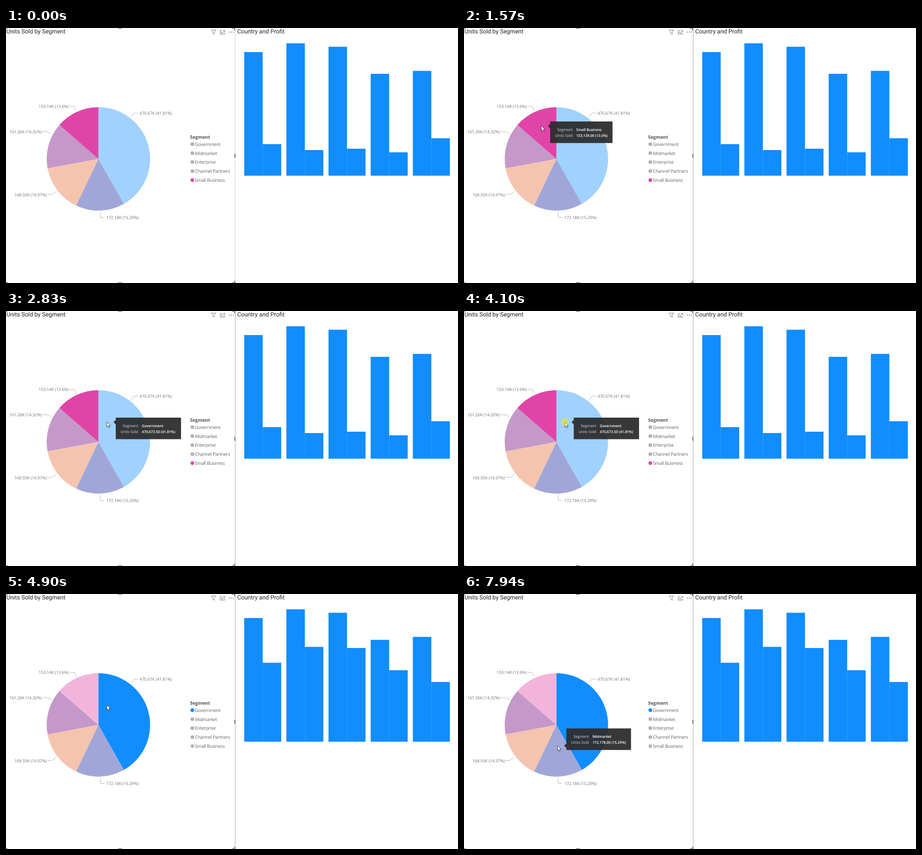
An HTML page for the animation above (8 s loop, 997 px wide and 562 px high).

```html
<!DOCTYPE html>
<html lang="en">
<head>
<meta charset="utf-8">
<title>Segment cross-filter</title>
<style>
  html, body { margin: 0; width: 100%; height: 100%; overflow: hidden; background: #fff; }
  svg { display: block; width: 100vw; height: 100vh; }
  text { font-family: "Open Sans", "Noto Sans", sans-serif; text-rendering: geometricPrecision; }
  .title { font: 13px Roboto, sans-serif; fill: #252423; }
  .label { font-size: 9.2px; letter-spacing: -.12px; fill: #74726f; }
  .legend { font-size: 10.2px; letter-spacing: -.3px; fill: #686664; }
  .head { font-size: 10.1px; font-weight: 700; fill: #55524f; }
  .tip { font-size: 8.3px; letter-spacing: -.02px; fill: #d6d6d6; text-anchor: end; }
  .value { font-size: 8px; font-weight: 600; letter-spacing: -.1px; fill: #fff; }
  .line { fill: none; stroke: #b4b2b0; }
  .icon { fill: none; stroke: #777; }
  .grip { fill: none; stroke: #7d7d7d; stroke-width: 2; }
</style>
</head>
<body>
<svg id="stage" viewBox="0 0 997 562">
  <g id="chart"></g>
  <path id="divider" d="M505.5 0V562"/>
  <g class="grip">
    <path d="M247 .5h9M247 561.5h9M0 .5h3M0 561.5h4M499 .5h5.5v5M499 561.5h5.5v-5"/>
    <path d="M505 277v9" stroke-width="2.5"/>
  </g>
  <g class="icon">
    <path d="M452.5 4.5H463L459.3 9V13.8L456.3 12V9Z"/>
    <path d="M477 5.5h-4.500v8h10v-3.500M479 5.500h3.500v3M482 6l-5 4.500M475.500 8v3h3.500"/>
  </g>
  <g fill="#666"><circle cx="492.5" cy="9" r="1.1"/><circle cx="497" cy="9" r="1.1"/><circle cx="501.500" cy="9" r="1.1"/></g>
  <text class="title" x="1" y="12">Units Sold by Segment</text>
  <text class="title" x="510" y="12">Country and Profit</text>
  <g id="tooltip">
    <path id="box" fill="rgb(46,46,46)" fill-opacity=".95"/>
    <text class="tip" x="49.500" y="21">Segment</text>
    <text class="tip" x="49.500" y="33.500">Units Sold</text>
    <text class="value" id="name" x="57.500" y="21"></text>
    <text class="value" id="units" x="57.500" y="33.500"></text>
  </g>
  <path id="cursor" d="M0 0V11.200L2.600 8.900 4.300 12.800 6.200 12 4.500 8.200H8Z" fill="#fff" stroke="#2b2b38" stroke-width=".9"/>
  <circle id="click" r="8.500" fill="#ffea00" fill-opacity=".5"/>
</svg>
<script>
const LOOP = 8000;
const $ = id => document.getElementById(id);
const chart = $('chart');

function add(tag, attrs, text) {
  const el = document.createElementNS('http://www.w3.org/2000/svg', tag);
  set(el, attrs);
  if (text) el.textContent = text;
  return chart.appendChild(el);
}
function set(el, attrs) {
  for (const key in attrs) el.setAttribute(key, attrs[key]);
}

// Pie: share, full colour, dimmed colour
const CX = 203.8, CY = 288.5, R = 114;
const slices = [
  [.4181, '#118dff', '#a0d1ff'],
  [.1529, '#12239e', '#a0a7d8'],
  [.1497, '#e66c37', '#f5c4af'],
  [.1432, '#6b007b', '#c499ca'],
  [.1361, '#e044a7', '#f3b4dc']
];
const rim = f => `${CX + R * Math.sin(f * 2 * Math.PI)} ${CY - R * Math.cos(f * 2 * Math.PI)}`;
let sum = 0;
const wedges = slices.map(([share]) => {
  const from = sum;
  sum += share;
  return add('path', { d: `M${CX} ${CY}L${rim(from)}A${R} ${R} 0 0 1 ${rim(sum)}Z` });
});

[
  ['470.67K (41.81%)', 294.5, 191, 'M276 195.5L282 187.5H291.5'],
  ['172.18K (15.29%)', 221, 421, 'M207.5 406L208.5 417.5H217'],
  ['168.55K (14.97%)', 18.5, 370.5, 'M111 360L102 366.500H92'],
  ['161.26K (14.32%)', 7.5, 231.500, 'M100.500 233L91 228.500H81'],
  ['153.14K (13.6%)', 72, 175.500, 'M155 182L150.500 172.500H141']
].forEach(([text, x, y, d]) => {
  add('path', { d, class: 'line' });
  add('text', { x, y, class: 'label' }, text);
});

add('text', { x: 406, y: 243.5, class: 'head' }, 'Segment');
const dots = ['Government', 'Midmarket', 'Enterprise', 'Channel Partners', 'Small Business'].map((text, i) => {
  const y = 256 + i * 19.8;
  add('text', { x: 416.5, y: y + 3.8, class: 'legend' }, text);
  return add('circle', { cx: 411, cy: y, r: 4 });
});

// Bars: top of the total, then of the part for each selection
const BASE = 325.5;
const bars = [
  [53, 256, 151.5],
  [33.7, 269, 116.5],
  [41.3, 266, 119],
  [101, 274, 168],
  [94.5, 243, 194]
];
const bar = (x, y) => add('rect', { x, y, width: 40.8, height: BASE - y, fill: '#118dff' });
const parts = bars.map(([top], i) => {
  const x = 525.4 + i * 93;
  bar(x, top);
  return bar(x + 40.8, top);
});

const tips = {
  small: ['Small Business', '153,139.00 (13.6%)', 137.5, 10],
  gov: ['Government', '470,673.50 (41.81%)', 144, 10],
  mid: ['Midmarket', '172,178.00 (15.29%)', 142.5, 38]
};

// Number of the n even steps from a to b that have begun
const step = (t, a, b, n) => t < a ? 0 : Math.min(n, Math.floor((t - a) / (b - a) * (n - 1) + 1e-6) + 1);
const ease = (p, power) => 1 - Math.pow(1 - Math.max(0, Math.min(1, p)), power);
const mix = (a, b, p) => a.map((v, i) => v + (b[i] - v) * p);

const ENTRY = [262, 564], PINK = [170.5, 215.5], BLUE = [222.5, 244.5], LOW = [208.5, 334], END = [206.3, 334];

function pointer(t, lag) {
  if (t < 2440) return mix(ENTRY, PINK, ease(step(t, 570, 1170, 10) / 10, 1.6));
  if (t < 5490) return mix(PINK, BLUE, ease((step(t, 2440, 2830, 7) - lag) / 6, 1.09));
  if (t < 6820) {
    const p = step(t, 5490, 6090, 10) / 10;
    return mix(BLUE, LOW, p * p * (3 - 2 * p));
  }
  return mix(LOW, END, step(t, 6820, 6880, 2) / 2);
}

function drawTooltip(t, x) {
  const fade = 1 - step(t, 4700, 4900, 4) / 4;
  const opacity = t < 1570 ? 0 : t < 6490 ? fade : 1;
  const [name, units, w, ay] = t >= 6490 ? tips.mid : x > CX ? tips.gov : tips.small;
  const [px, py] = pointer(t, .6);
  const top = t >= 6490 ? py - 37.8 : py - 9.5;
  $('name').textContent = name;
  $('units').textContent = units;
  set($('box'), { d: `M0 0H${w}V47.5H0V${Math.min(47.5, ay + 5)}L-5 ${ay}L0 ${ay - 5}Z` });
  set($('tooltip'), { opacity, transform: `translate(${px + 19.6} ${top})` });
}

function draw(t) {
  const picked = t < 4300 ? 4 : 0;
  slices.forEach(([, full, dim], i) => {
    const on = i === picked;
    set(wedges[i], { fill: on ? full : dim });
    set(dots[i], { fill: on ? full : i === 4 ? '#b0b4c2' : '#b3b1b0' });
  });
  parts.forEach((el, i) => {
    const y = bars[i][t < 4430 ? 1 : 2];
    set(el, { y, height: BASE - y });
  });
  set($('divider'), { stroke: t < 570 ? '#c8c8c8' : '#a6a6a6' });

  const [x, y] = pointer(t, 0);
  const at = `translate(${x} ${y})`;
  set($('cursor'), { transform: at, opacity: t < 570 ? 0 : 1 });
  const pressed = (t >= 4100 && t < 4300) || (t >= 7550 && t < 7940);
  set($('click'), { transform: at, opacity: pressed ? 1 : 0 });
  drawTooltip(t, x);
}

const start = performance.now();
function tick() {
  draw((performance.now() - start) % LOOP);
  requestAnimationFrame(tick);
}
tick();
</script>
</body>
</html>
```
